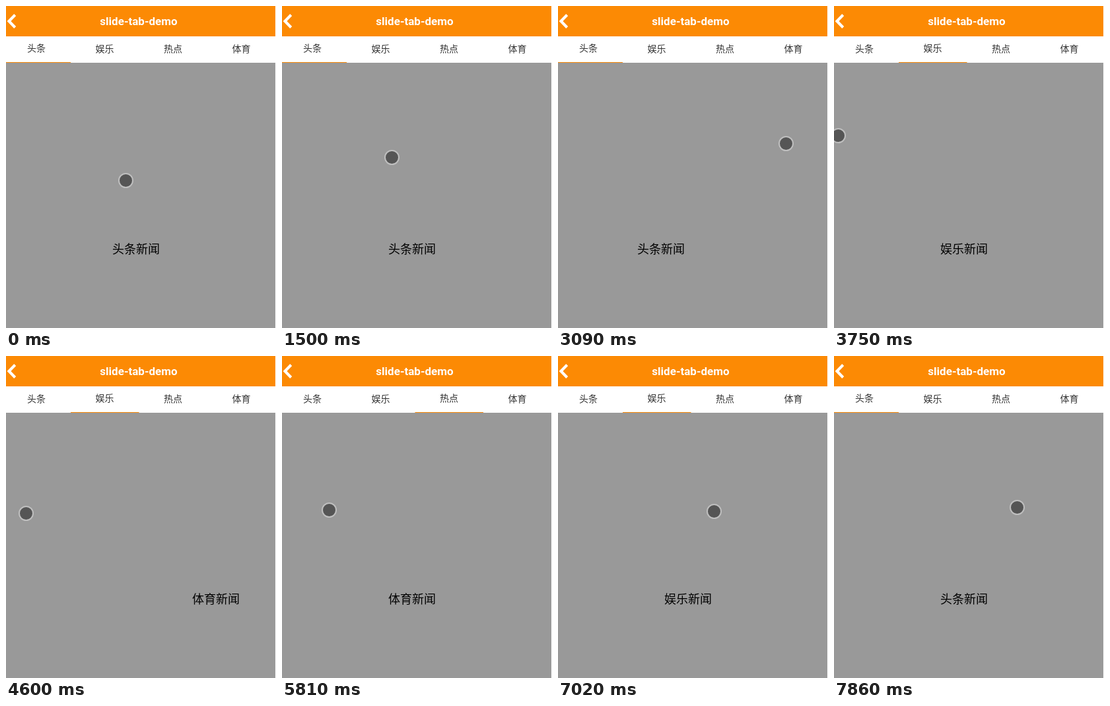
An HTML page that plays this animation: 409 by 488 pixels, repeating every 8000 ms.

```html
<!DOCTYPE html>
<html lang="zh-CN">
<head>
<meta charset="utf-8">
<title>slide-tab-demo</title>
<style>
  html, body { margin: 0; width: 100%; height: 100%; overflow: hidden; background: #999; }
  svg { display: block; width: 409px; height: 488px; }
  text { font-family: "Noto Sans CJK SC", "Noto Sans CJK", sans-serif; font-weight: 300; text-anchor: middle; }
  .title { font: bold 17px Roboto, sans-serif; fill: #fff; }
  .tab { font-size: 14px; fill: #333; }
  .label { font-size: 18px; fill: #000; }
</style>
</head>
<body>
<svg viewBox="0 0 409 488">
  <rect width="409" height="488" fill="#999"/>
  <g id="pages"></g>
  <rect width="408" height="46" fill="#fc8a04"/>
  <polyline points="13.7,13.5 4.5,23 13.7,32.5" fill="none" stroke="#fff" stroke-width="4.2"/>
  <text class="title" x="201" y="29">slide-tab-demo</text>
  <rect y="46" width="408" height="40" fill="#fff"/>
  <g id="tabs"></g>
  <rect id="line" y="85" width="103.5" height="1" fill="#fc8a04"/>
  <circle id="touch" cx=".5" cy=".5" r="10.5" fill="#555" stroke="#bfbfbf" stroke-width="2"/>
  <rect x="408" width="1" height="488" fill="#fff"/>
</svg>
<script>
const LOOP = 8000, PAGE = 409, TAB = 103.5;
const $ = id => document.getElementById(id);

function addText(parent, cls, x, y, str) {
  const el = document.createElementNS("http://www.w3.org/2000/svg", "text");
  el.setAttribute("class", cls);
  el.setAttribute("x", x);
  el.setAttribute("y", y);
  el.textContent = str;
  return parent.appendChild(el);
}

const tabs = ["头条", "娱乐", "热点", "体育"].map((s, i) =>
  addText($("tabs"), "tab", 46 + i * TAB, 70, s));
["头条新闻", "娱乐新闻", "体育新闻"].forEach((s, i) =>
  addText($("pages"), "label", 197 + i * PAGE, 375, s));

// The screen refreshes in slightly quickening ticks after an initial pause
const ticks = [];
for (let t = 1500, step = 141.8; t < LOOP; t += step, step -= 0.2) ticks.push(t);

// Touch gestures, timed in ticks; a swipe drags the page and then settles on another
const gestures = [];
const move = (from, to, x, y, power = 1) => gestures.push({ from, to, x, y, power });
const swipe = (from, to, x, y, page, power = 1) => gestures.push({ from, to, x, y, page, power });

move(-1, 3, 121, 123);
move(4, 9, 386, 209, 1.75);
swipe(9, 13, 13, 196, 1, 3.2);
move(13, 16, 6, 196);
move(16, 18, 355, 270);
move(19, 20, 318, 256);
swipe(20, 22, 30, 238, 2);
move(22, 26, 6, 241);
move(27, 31, 71, 233);
move(32, 33, 80, 235);
swipe(33, 36, 370, 240, 1);
move(36, 40, 236, 235);
move(40, 42, 95, 230);
swipe(42, 44, 366, 232, 0);
move(44, 46, 277, 229);

function stateAt(tick) {
  let x = 181, y = 264, page = 0, drag = 0;
  for (const g of gestures) {
    if (tick <= g.from) break;
    const f = Math.min(1, (tick - g.from) / (g.to - g.from)) ** g.power;
    const dx = (g.x - x) * f;
    x += dx;
    y += (g.y - y) * f;
    if (g.page === undefined) continue;
    if (tick > g.to) page = g.page;
    else drag = dx;
  }
  return { x: Math.round(x), y: Math.round(y), page, scroll: Math.round(page * PAGE - drag) };
}

function draw(time) {
  const tick = ticks.filter(t => t <= time).length - 1;
  const { x, y, page, scroll } = stateAt(tick);
  $("touch").setAttribute("transform", `translate(${x} ${y})`);
  $("pages").setAttribute("transform", `translate(${-scroll} 0)`);
  $("line").setAttribute("x", page * TAB - 5.5);
  tabs.forEach((el, i) => el.setAttribute("y", i === page ? 69 : 70));
}

function frame() {
  draw(performance.now() % LOOP);
  requestAnimationFrame(frame);
}
frame();
</script>
</body>
</html>
```
